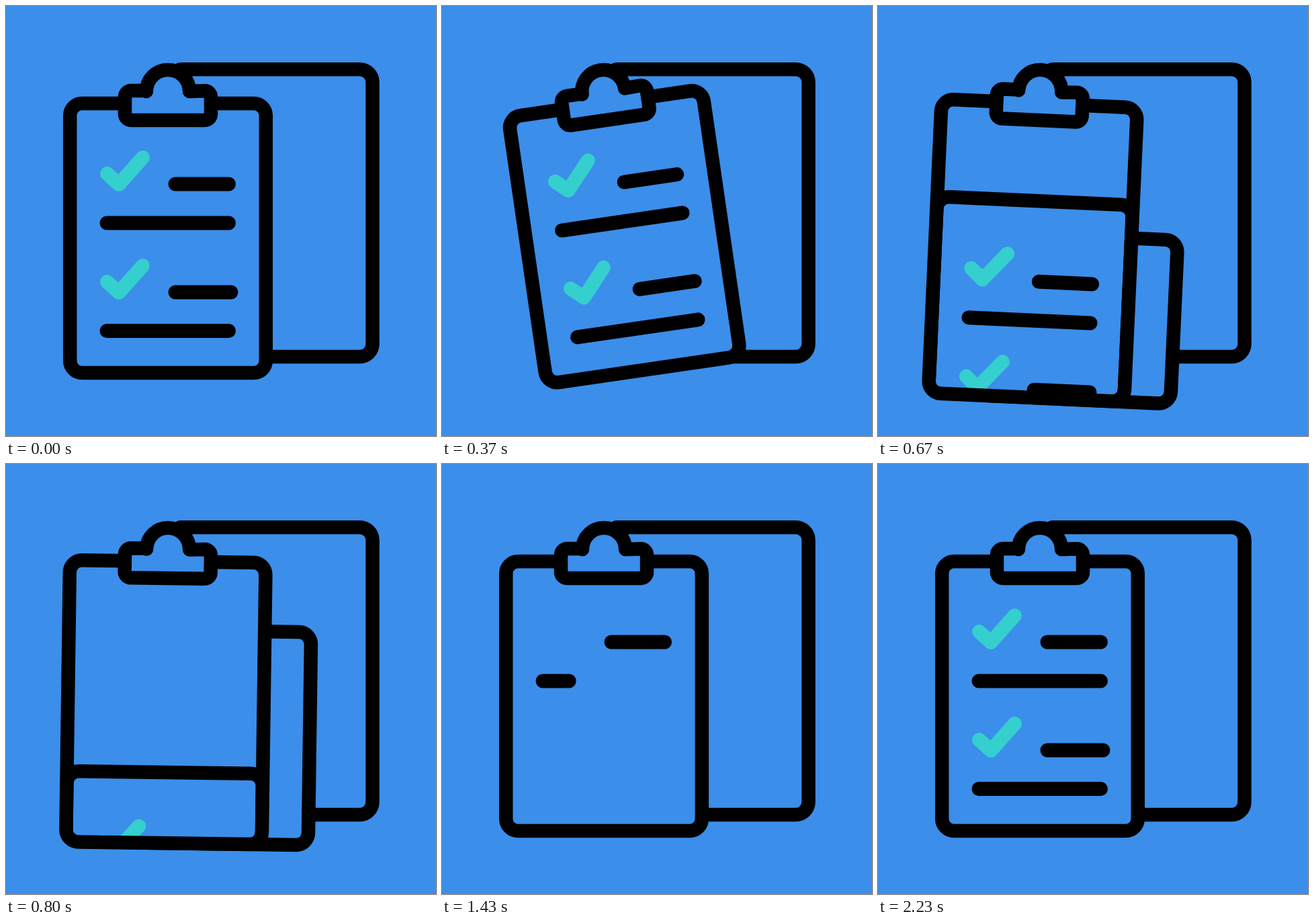
An HTML page with a canvas for the animation above (2.5 s loop, 640x640 px).

```html
<!DOCTYPE html>
<html lang="en">
<head>
<meta charset="utf-8">
<title>Clipboard</title>
<style>
  html, body { margin: 0; height: 100%; overflow: hidden; background: #3b8eea; }
  canvas { display: block; width: 100vmin; height: 100vmin; }
</style>
</head>
<body>
<canvas id="stage" width="640" height="640"></canvas>
<script>
const ctx = document.getElementById('stage').getContext('2d');
const BLUE = '#3b8eea', INK = '#000', TEAL = '#35cfce';
const LOOP = 2500, PIVOT = [241, 132];
const LEFT = 95.2, TOP = 145, WIDTH = 291.6, BOTTOM = 546, RADIUS = 18;
const DRAW_START = 1228, DRAW_TIME = 167;

// Time, angle in degrees
const SWING = [[0, 0], [210, 4.1], [400, -9], [650, 2.65], [890, 0]];

// Strokes in the order they are written
const tick = y => [[150.5, y], [168, y + 16], [203.5, y - 24]];
const MARKS = [
  [[252, 265], [331.5, 265]],
  [[150, 323], [331.5, 323]],
  [[252, 426], [335, 426]],
  [[150, 483.5], [331.5, 483.5]],
  tick(249.5),
  tick(410.5)
];

const clamp = x => Math.min(1, Math.max(0, x));
const progress = (t, from, to) => clamp((t - from) / (to - from));
const ease = p => (1 - Math.cos(Math.PI * p)) / 2;

function swingAngle(t) {
  for (let i = 1; i < SWING.length; i++) {
    const [t0, a0] = SWING[i - 1], [t1, a1] = SWING[i];
    if (t < t1) return (a0 + (a1 - a0) * ease(progress(t, t0, t1))) * Math.PI / 180;
  }
  return 0;
}

function sheetPath(x, top, bottom) {
  const h = Math.max(0, bottom - top);
  ctx.beginPath();
  ctx.roundRect(x, top, WIDTH, h, Math.min(RADIUS, h / 2));
}

function outline() {
  ctx.lineWidth = 20.5;
  ctx.strokeStyle = INK;
  ctx.stroke();
}

function sheet(x, top, bottom) {
  sheetPath(x, top, bottom);
  ctx.fill();
  outline();
}

// Draws the first part p of a polyline
function mark(points, p) {
  if (p <= 0) return;
  const lengths = points.slice(1).map((b, i) => Math.hypot(b[0] - points[i][0], b[1] - points[i][1]));
  let left = p * lengths.reduce((a, b) => a + b);
  ctx.beginPath();
  ctx.moveTo(...points[0]);
  lengths.forEach((len, i) => {
    if (left <= 0) return;
    const k = Math.min(1, left / len), [x, y] = points[i], [x2, y2] = points[i + 1];
    ctx.lineTo(x + (x2 - x) * k, y + (y2 - y) * k);
    left -= len;
  });
  ctx.lineWidth = 21;
  ctx.strokeStyle = points.length > 2 ? TEAL : INK;
  ctx.stroke();
}

function backBoard() {
  ctx.beginPath();
  ctx.moveTo(259, 94.2);
  ctx.arcTo(545.5, 94.2, 545.5, 300, 19);
  ctx.arcTo(545.5, 522, 300, 522, 19);
  ctx.lineTo(300, 522);
  outline();
}

function clip() {
  ctx.beginPath();
  ctx.moveTo(209, 126);
  ctx.arc(241, 127, 32, Math.PI, 0);
  ctx.arcTo(305, 126, 305, 150, 9);
  ctx.arcTo(305, 170, 241, 170, 9);
  ctx.arcTo(177, 170, 177, 150, 9);
  ctx.arcTo(177, 126, 209, 126, 9);
  ctx.closePath();
  ctx.fill();
  outline();
}

function render(t) {
  const slide = t > 395 ? (0.04365 * (t - 395)) ** 2 : 0;
  const stretch = Math.min(slide * 1.12, 37) * (1 - ease(progress(t, 700, 900)));
  const bottom = BOTTOM + stretch;

  ctx.fillStyle = BLUE;
  ctx.fillRect(0, 0, 640, 640);
  ctx.lineCap = ctx.lineJoin = 'round';
  backBoard();

  ctx.save();
  ctx.translate(...PIVOT);
  ctx.rotate(swingAngle(t));
  ctx.translate(-PIVOT[0], -PIVOT[1]);

  // Fresh sheet rises beside the board, then tucks in behind it
  const rise = Math.max(0, 0.706 * (946 - t));
  const tuck = ease(progress(t, 1070, 1240));
  if (rise < 400 && tuck < 1) sheet(LEFT + 69 * (1 - tuck), TOP + rise, bottom);

  sheetPath(LEFT, TOP, bottom);
  ctx.fill();
  ctx.save();
  ctx.clip();
  if (t < DRAW_START) {
    ctx.translate(0, slide);
    if (slide > 0) sheet(LEFT, TOP, BOTTOM);
    MARKS.forEach(points => mark(points, 1));
  } else {
    MARKS.forEach((points, i) => mark(points, clamp((t - DRAW_START) / DRAW_TIME - i)));
  }
  ctx.restore();

  sheetPath(LEFT, TOP, bottom);
  outline();
  clip();
  ctx.restore();
}

const start = performance.now();
function loop() {
  render((performance.now() - start) % LOOP);
  requestAnimationFrame(loop);
}
loop();
</script>
</body>
</html>
```
